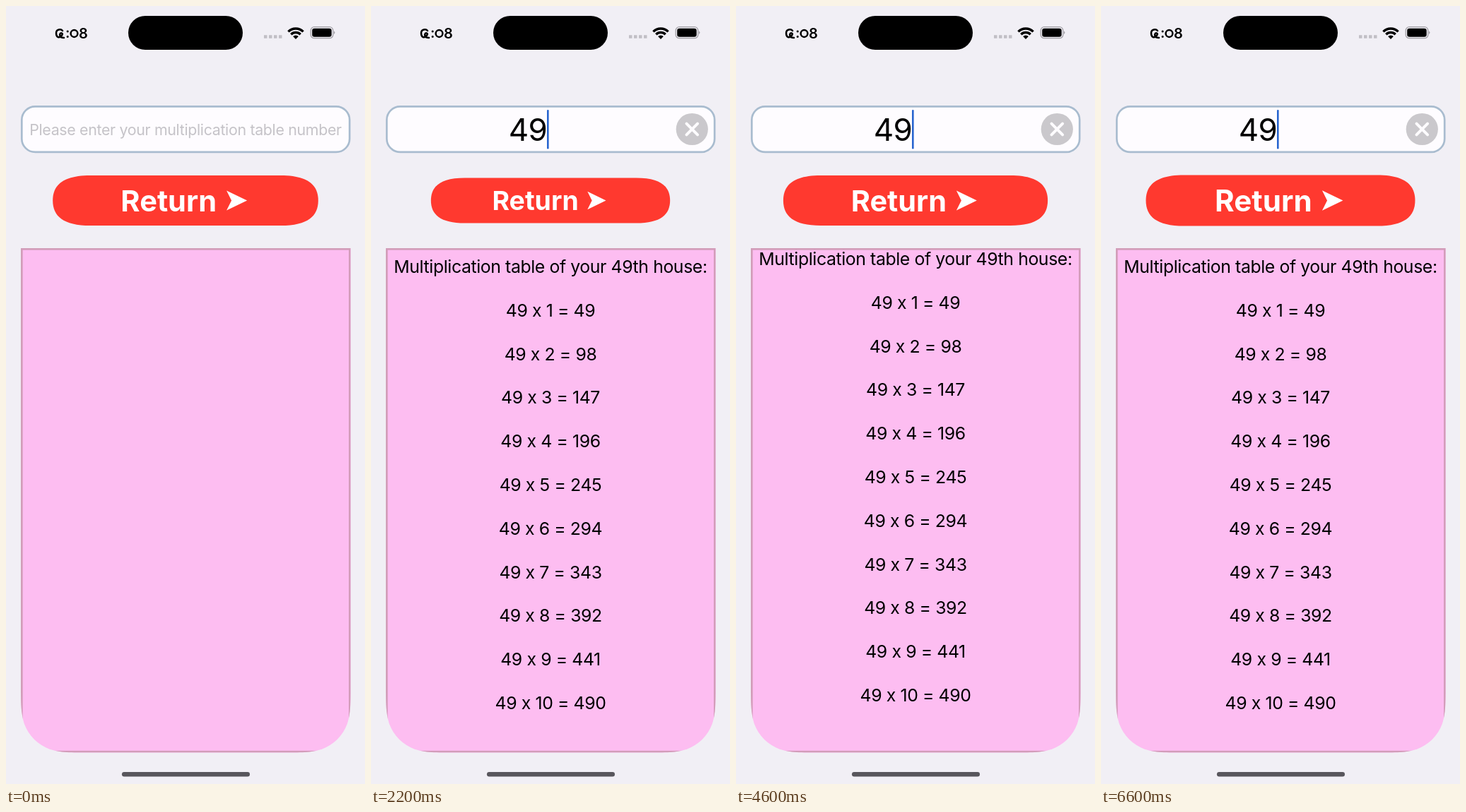
Recreate the animation shown at these times as an HTML page. Size 508 px wide and 1102 px high, loop 6700 ms.

```html
<!DOCTYPE html>
<html lang="en">
<head>
<meta charset="utf-8">
<title>Multiplication table</title>
<style>
  html, body { margin: 0; width: 100%; height: 100%; overflow: hidden; background: #f1eff5; }
  svg { display: block; width: 100vw; height: 100vh; font-family: Inter, "Open Sans", sans-serif; }
  .center { text-anchor: middle; letter-spacing: -.016em; }
</style>
</head>
<body>
<svg viewBox="0 0 508 1102">
  <defs>
    <clipPath id="panelShape"><path id="panelPath"/></clipPath>
  </defs>

  <!-- Status bar -->
  <g fill="none" stroke="#000" stroke-width="2.500" stroke-linecap="round">
    <path d="M80 35C78 32.500 71 32.500 71 38.500S75 45 77 43.500 81 39.500 79 38.500 75.500 40 76.500 42.500 79.500 45 82 45"/>
    <circle cx="96.500" cy="39" r="4.900"/>
  </g>
  <g font-size="20" font-weight="600"><text x="84" y="45">:</text><text x="103" y="46">8</text></g>
  <rect x="173" y="14" width="162" height="48" rx="24"/>
  <path d="M365 43.500h26" stroke="#c1bfc5" stroke-width="4.500" stroke-dasharray="4.500 2.500"/>
  <g fill="none" stroke="#000" stroke-width="3.400">
    <path d="M399.400 36.400A15 15 0 0 1 420.600 36.400"/>
    <path d="M403.300 40.300A9.500 9.500 0 0 1 416.700 40.300"/>
  </g>
  <path d="M406.100 43.100A5.500 5.500 0 0 1 413.900 43.100L410 47Z"/>
  <rect x="431.200" y="29.700" width="31.600" height="16" rx="5" fill="none" stroke="#a09ea4" stroke-width="1.300"/>
  <rect x="433.200" y="31.700" width="27.500" height="12" rx="3.300"/>
  <path d="M464 35.500Q467 37.700 464 40Z" fill="#a09ea4"/>

  <!-- Input field -->
  <rect x="22.300" y="142.300" width="463.900" height="64.600" rx="19" fill="#fefcff" stroke="#a9bccf" stroke-width="2.700"/>
  <text id="placeholder" class="center" x="254" y="183" font-size="21.400" fill="#c5c3c8">Please enter your multiplication table number</text>
  <text id="entry" class="center" x="222" y="191" font-size="44"></text>
  <rect id="caret" y="147" width="2.600" height="55.500" rx="1.200" fill="#2865cf"/>
  <g id="clear">
    <circle cx="454.300" cy="174.500" r="22.600" fill="#cac8cc"/>
    <path d="M446.500 166.700l15.600 15.600m0-15.600l-15.600 15.600" stroke="#fefcff" stroke-width="4" stroke-linecap="round"/>
  </g>

  <!-- Button, drawn around its own centre -->
  <g id="button" fill="#fff">
    <path fill="#ff392f" d="M-134.500-35.500H134.500C173-35.500 187.500-22 187.500 0S173 35.500 134.500 35.500H-134.500C-173 35.500-187.500 22-187.500 0S-173-35.500-134.500-35.500Z"/>
    <text x="-91.500" y="15.500" font-size="41.500" font-weight="700">Return</text>
    <path d="M58-14L87 0 58 14 65 0Z"/>
  </g>

  <!-- Result panel: a square border cut by round lower corners -->
  <g clip-path="url(#panelShape)">
    <rect x="21" y="343" width="467" height="715" fill="#fdbdf1"/>
    <g id="table" class="center" font-size="24.800"></g>
    <rect x="22.300" y="344.300" width="464.100" height="711.900" fill="none" stroke="#d29db9" stroke-width="2.700"/>
  </g>
  <rect x="164" y="1085" width="181" height="6.500" rx="3.200" fill="#58565c"/>
</svg>

<script>
const LOOP = 6700, TABLE_AT = 1800, FOCUS_AT = 700;
const NUMBER = 49, FIRST_LINE = 378, LINE_STEP = 61.8;
const el = id => document.getElementById(id);
const clamp = v => Math.max(0, Math.min(1, v));
const show = (id, on) => el(id).setAttribute("visibility", on ? "visible" : "hidden");

// Continuous-curvature corner: points measured from the corner, in radii.
function buildPanelPath(left, top, right, bottom, radius) {
  const curve = [[0, 1.529], [0, 1.088], [0, .868], [.075, .631], [.169, .373],
                 [.373, .169], [.631, .075], [.868, 0], [1.088, 0], [1.529, 0]];
  const leftCorner = curve.map(([x, y]) => [left + x * radius, bottom - y * radius]);
  const rightCorner = curve.map(([x, y]) => [right - x * radius, bottom - y * radius]).reverse();
  const draw = ([start, ...rest]) => `L${start}C${rest.join(" ")}`;
  return `M${left},${top}${draw(leftCorner)}${draw(rightCorner)}L${right},${top}Z`;
}
el("panelPath").setAttribute("d", buildPanelPath(21, 343, 487.7, 1057.5, 64.6));

const lines = [`Multiplication table of your ${NUMBER}th house:`];
for (let i = 1; i <= 10; i++) lines.push(`${NUMBER} x ${i} = ${NUMBER * i}`);
el("table").innerHTML = lines
  .map((line, i) => `<text x="254" y="${FIRST_LINE + i * LINE_STEP}">${line}</text>`).join("");

// Auto-reversing damped spring from 0.9 to 1.
function buttonScale(t) {
  const half = 750, lowest = 692;
  const phase = (t - lowest + 10 * half) % (2 * half);
  const s = Math.min(phase, 2 * half - phase) / 1000;
  const damping = 6, speed = 23;
  return 1 - .1 * Math.exp(-damping * s) *
    (Math.cos(speed * s) + damping / speed * Math.sin(speed * s));
}

// Finger drags as [time, offset], eased between stops.
const drags = [[2300, 0], [2650, 6], [2980, 50], [3300, -26], [3720, 60], [4000, 13],
               [4450, -12], [5100, -4], [5450, 12], [5750, 12], [6200, 0]];
function scrollOffset(t) {
  const next = drags.findIndex(([time]) => time > t);
  if (next < 1) return 0;
  const [t0, y0] = drags[next - 1], [t1, y1] = drags[next];
  const p = (t - t0) / (t1 - t0);
  return y0 + (y1 - y0) * p * p * (3 - 2 * p);
}

function caretOpacity(t) {
  const phase = t % 1000 / 1000;
  return Math.min(clamp((phase - .06) / .1), clamp((.8 - phase) / .15));
}

function render(t) {
  const typed = String(NUMBER).slice(0, t < 900 ? 0 : t < 1100 ? 1 : 2);
  el("entry").textContent = typed;
  show("placeholder", !typed);
  show("clear", typed);
  show("caret", t >= FOCUS_AT);
  el("caret").setAttribute("x", [29, 235.5, 249][typed.length]);
  el("caret").setAttribute("opacity", caretOpacity(t));
  el("button").setAttribute("transform", `translate(254 275.5) scale(${buttonScale(t)})`);
  show("table", t >= TABLE_AT);
  el("table").setAttribute("transform", `translate(0 ${scrollOffset(t)})`);
}

const start = performance.now();
function tick() {
  render((performance.now() - start) % LOOP);
  requestAnimationFrame(tick);
}
tick();
</script>
</body>
</html>
```
